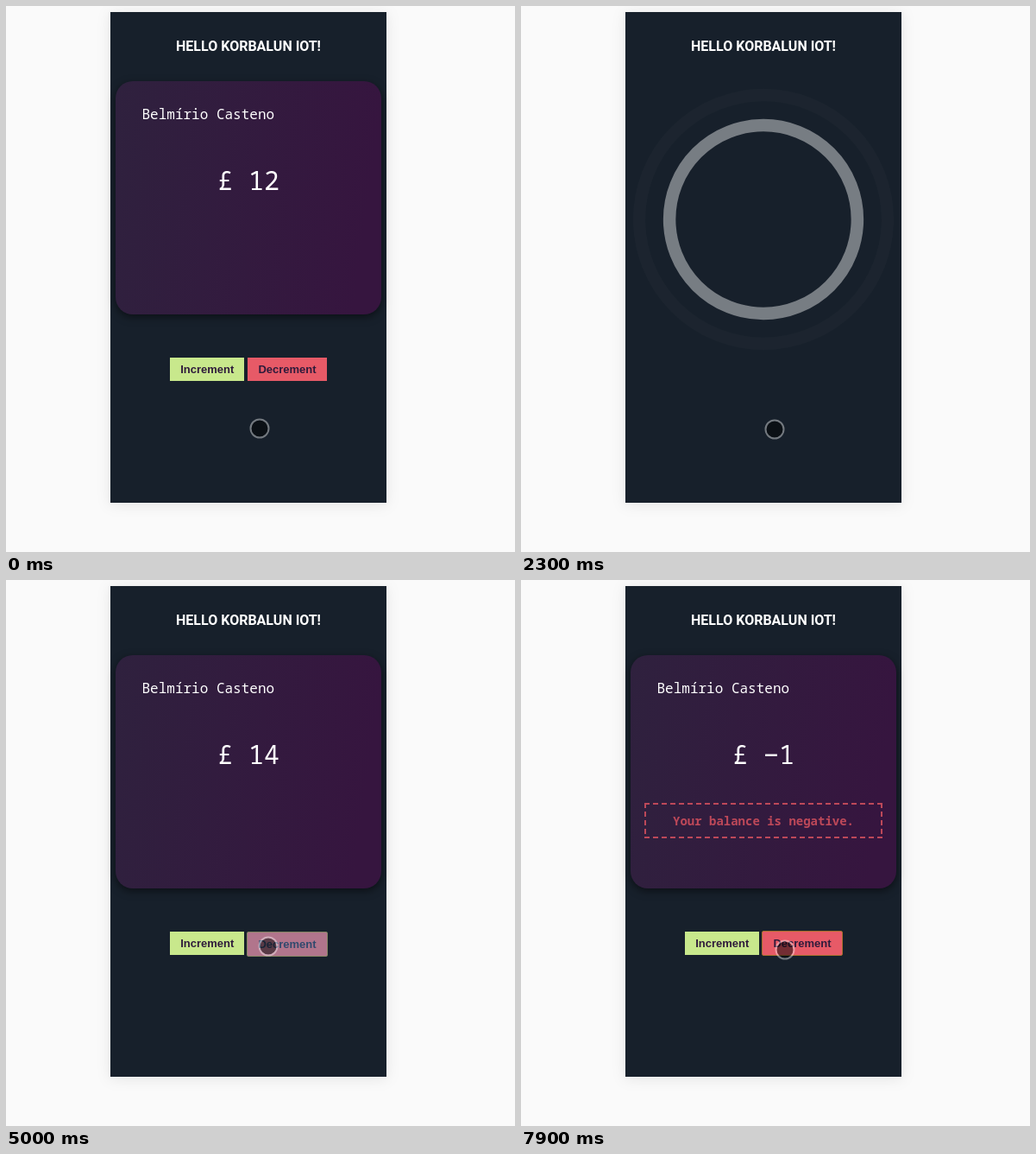
Animation of 590x632 px, one loop 8000 ms. Source, as an HTML page:

```html
<!DOCTYPE html>
<html lang="en">
<head>
<meta charset="utf-8">
<title>Balance card</title>
<style>
  html, body { margin: 0; width: 100%; height: 100%; overflow: hidden; background: #fafafa; }
  svg { display: block; }
  .phone { fill: #17202b; filter: drop-shadow(0 2px 8px rgba(0, 0, 0, .09)); }
  .card { fill: url(#plum); filter: drop-shadow(0 3px 5px rgba(0, 0, 0, .5)); }
  .title { font: 700 16px Roboto, sans-serif; fill: #fff; }
  .mono { font: 16px "Noto Sans Mono", monospace; fill: #fff; }
  .amount { font-size: 30px; }
  .warn text { font-size: 14px; font-weight: 700; fill: #bd4859; }
  .warn path { fill: none; stroke: #bd4859; stroke-width: 2; stroke-dasharray: 6 4; }
  .button text { font: 700 13px "Liberation Sans", Arial, sans-serif; fill: #2f1b3b; }
  .ring { fill: none; stroke: #a8702c; }
  .tint { fill: #33b5e5; }
  .status rect, .status path { fill: #eee; }
  .status text { font: 12px "Noto Sans", sans-serif; fill: #66696d; }
  .mid { text-anchor: middle; }
</style>
</head>
<body>
<svg width="590" height="632" viewBox="0 0 590 632">
  <defs>
    <linearGradient id="plum" x1="0" y1="0" x2="1" y2=".12">
      <stop offset="0" stop-color="#2f213e"/>
      <stop offset="1" stop-color="#36153f"/>
    </linearGradient>
  </defs>
  <rect class="phone" x="121" y="7" width="320" height="568"/>
  <text class="title mid" x="281" y="52">HELLO KORBALUN IOT!</text>

  <g id="loader" fill="none" stroke="#fff" stroke-width="14.5">
    <circle cx="281" cy="247"/>
    <circle cx="281" cy="247"/>
  </g>

  <g id="content">
    <rect class="card" x="127" y="87" width="308" height="270" rx="20"/>
    <text class="mono" x="157.5" y="131">Belmírio Casteno</text>
    <text class="mono amount mid" id="amount" x="281" y="213"></text>
    <g class="warn" id="warn">
      <path d="M143 259H419M143 298H419M144 258V299M418 258V299"/>
      <text class="mono mid" x="281" y="284">Your balance is negative.</text>
    </g>
    <g class="button" id="inc">
      <rect x="190" y="407" width="86" height="27" fill="#c8e88c"/>
      <text class="mid" x="233.3" y="425">Increment</text>
      <rect class="ring" x="189.5" y="406.5" width="87" height="28" rx="1.5"/>
      <rect class="tint" x="189" y="406" width="88" height="29" rx="2"/>
    </g>
    <g class="button" id="dec">
      <rect x="280" y="407" width="92" height="27" fill="#e75a67"/>
      <text class="mid" x="326" y="425">Decrement</text>
      <rect class="ring" x="279.5" y="406.5" width="93" height="28" rx="1.5"/>
      <rect class="tint" x="279" y="406" width="94" height="29" rx="2"/>
    </g>
  </g>

  <g class="status" id="status">
    <path d="M121 553H222Q225 553 225 556V575H121Z"/>
    <text x="126" y="568">Waiting for de...</text>
  </g>

  <g id="touch">
    <circle r="9.5" fill="#000" fill-opacity=".5"/>
    <circle r="10.5" fill="none" stroke="#fff" stroke-opacity=".4" stroke-width="2"/>
  </g>
  <path id="arrow" d="M0 0V16L4 12.5L6.5 18L9 17L6.5 11.5H11.5Z" fill="#111" stroke="#fff"/>
</svg>
<script>
const LOOP = 8000, STEP = 100, LOAD = 1800, READY = 2650;
const GAP = 145, FIRST_INC = 3620, FIRST_DEC = 4610, LAST_DEC = 7200;
const INCS = 5, DECS = 18;
const $ = id => document.getElementById(id);
const clamp = (v, a, b) => Math.min(b, Math.max(a, v));
const show = (el, on) => el.setAttribute("visibility", on ? "inherit" : "hidden");

// time, x, y of the pointer
const path = [
  [0, 294, 489], [200, 312, 501], [500, 430, 567], [800, 546, 621],
  [900, 557, 631], [1000, 557, 626], [1200, 440, 574], [1400, 325, 516],
  [1600, 299, 499], [1800, 299, 499], [2000, 295, 491], [2300, 294, 490],
  [2700, 294, 490], [2900, 278, 465], [3200, 250, 434], [3500, 241, 425],
  [4200, 241, 425], [4500, 303, 424], [5000, 304, 424], [6700, 304, 424],
  [7300, 305, 426], [7900, 306, 428]
];

function bezier(x1, y1, x2, y2) {
  const at = (a, b, s) => 3 * (1 - s) ** 2 * s * a + 3 * (1 - s) * s * s * b + s ** 3;
  return p => {
    let lo = 0, hi = 1;
    for (let i = 0; i < 20; i++) {
      const m = (lo + hi) / 2;
      if (at(x1, x2, m) < p) lo = m; else hi = m;
    }
    return at(y1, y2, lo);
  };
}
const grow = bezier(.165, .84, .44, 1);
const dim = bezier(.3, .61, .355, 1);
const ease = bezier(.25, .1, .25, 1);

function pointerAt(t) {
  const i = path.findIndex(p => p[0] > t);
  if (i < 0) return path[path.length - 1].slice(1);
  const [a, b] = [path[i - 1], path[i]];
  const k = (t - a[0]) / (b[0] - a[0]);
  return [a[1] + (b[1] - a[1]) * k, a[2] + (b[2] - a[2]) * k];
}

const clicks = (t, first, max) => clamp(Math.floor((t - first) / GAP) + 1, 0, max);

function balanceAt(t) {
  const taken = t >= LAST_DEC ? DECS : clicks(t, FIRST_DEC, DECS - 1);
  return 12 + clicks(t, FIRST_INC, INCS) - taken;
}

function drawButton(id, t, first, last, focused) {
  const phase = ((t - first) / GAP + 1.4) % 1;
  const down = t >= first - 60 && t < last && phase < .5;
  const [, , ring, tint] = $(id).children;
  $(id).setAttribute("transform", `translate(0 ${down ? 1 : 0})`);
  show(ring, focused);
  tint.setAttribute("opacity", down ? .27 + .13 * Math.min(1, phase / .4) : 0);
}

function drawLoader(t) {
  show($("loader"), t >= LOAD && t < READY);
  [...$("loader").children].forEach((ring, i) => {
    const p = Math.max(0, (t - LOAD) / 1800 + i / 2) % 1;
    ring.setAttribute("r", (1 + 19 * grow(p)) * 320 / 44);
    ring.setAttribute("opacity", 1 - dim(p));
  });
}

function drawPointer(t) {
  const [x, y] = pointerAt(t);
  const inside = x < 441 && y < 575;
  show($("touch"), inside);
  show($("arrow"), !inside);
  for (const id of ["touch", "arrow"]) $(id).setAttribute("transform", `translate(${x} ${y})`);
}

function draw(t) {
  const balance = balanceAt(t);
  const shown = t < LOAD ? 1 : ease(clamp((t - READY) / 400, 0, 1));
  $("content").setAttribute("opacity", shown);
  show($("content"), shown > 0);
  $("amount").textContent = "£ " + (balance < 0 ? "−" : "") + Math.abs(balance);
  show($("warn"), balance < 0);
  show($("status"), t >= 1400 && t < LOAD);
  const toDec = FIRST_DEC - 60;
  drawButton("inc", t, FIRST_INC, FIRST_INC + GAP * (INCS - 1) + 15, t >= FIRST_INC - 60 && t < toDec);
  drawButton("dec", t, FIRST_DEC, LAST_DEC, t >= toDec);
  drawLoader(t);
  drawPointer(t);
}

const start = performance.now();
function tick() {
  const t = (performance.now() - start + 8) % LOOP;
  draw(Math.floor(t / STEP) * STEP);
  requestAnimationFrame(tick);
}
tick();
</script>
</body>
</html>
```
